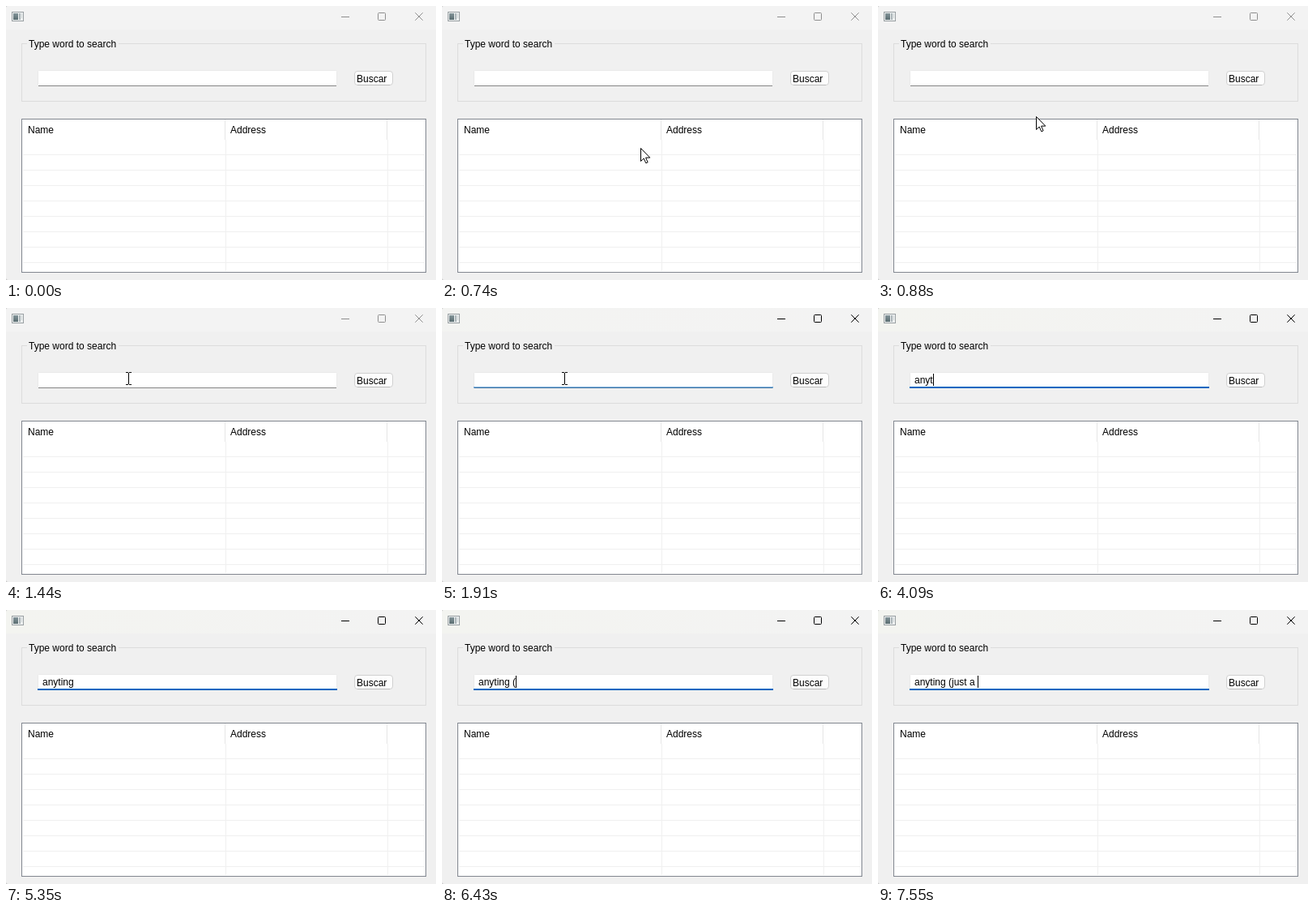
These frames come from a looping animation (531x338 px, 8000 ms). An HTML page:

```html
<!DOCTYPE html>
<html lang="en">
<head>
<meta charset="utf-8">
<title>Search window</title>
<style>
html, body { margin: 0; width: 100%; height: 100%; overflow: hidden; background: #f0f0f0; }
#win { position: relative; width: 531px; height: 338px; overflow: hidden; }
svg { position: absolute; left: 0; top: 0; }
.t {
  position: absolute; white-space: pre; color: #000;
  font: 12px/14px "Liberation Sans", Arial, sans-serif;
}
.line { shape-rendering: crispEdges; }
#caret {
  display: inline-block; vertical-align: top;
  width: 1px; height: 15px; margin-top: -1px; background: #000;
}
</style>
</head>
<body>
<div id="win">
  <svg width="531" height="338" viewBox="0 0 531 338">
    <defs>
      <linearGradient id="tint">
        <stop offset="0" stop-color="#f3f4f0"/>
        <stop offset="1" stop-color="#f3f3f3"/>
      </linearGradient>
      <linearGradient id="pane" x2="0" y2="1">
        <stop offset="0" stop-color="#84959a"/>
        <stop offset="1" stop-color="#5a6d71"/>
      </linearGradient>
    </defs>
    <rect width="531" height="338" fill="#f0f0f0"/>
    <rect width="531" height="29" fill="#f3f3f3"/>
    <rect id="active" width="531" height="29" fill="url(#tint)" opacity="0"/>
    <path d="M0 335v3h3a3 3 0 0 1-3-3zM0 2V0h2a2 2 0 0 0-2 2z" fill="#c4c4c4"/>

    <!-- window icon -->
    <g class="line">
      <rect x="7" y="7" width="15" height="12" fill="#9aa0a3"/>
      <rect x="8" y="8" width="13" height="10" fill="#eef1f1"/>
      <rect x="9" y="9" width="6" height="8" fill="url(#pane)"/>
      <rect x="16" y="9" width="2" height="8" fill="#a9b3b7"/>
      <rect x="19" y="9" width="1" height="6" fill="#cfd5d7"/>
    </g>
    <g id="caption" fill="none">
      <path d="M414 13.500h10"/>
      <rect x="459.500" y="8.500" width="9" height="9" rx="1"/>
      <path d="M505.300 8.300l9.400 9.400M514.700 8.300l-9.400 9.400"/>
    </g>

    <!-- group box, field and button -->
    <path class="line" d="M26 46.500H19.500V117.500H518.500V46.500H139" fill="none" stroke="#dcdcdc"/>
    <rect x="39.500" y="79.500" width="369" height="19" rx="1" fill="#fff" stroke="#eaeaea"/>
    <path class="line" d="M40 98.500h368" stroke="#868686"/>
    <rect id="focus" class="line" x="39" y="97" width="370" height="2" fill="#0067c0" opacity="0"/>
    <rect x="430.500" y="80.500" width="47" height="17" rx="3.500" fill="#fdfdfd" stroke="#d0d0d0"/>
    <path d="M434 97.500h40" stroke="#bcbcbc"/>

    <!-- list -->
    <rect class="line" x="19.500" y="139.500" width="499" height="189" fill="#fff" stroke="#828790"/>
    <path class="line" d="M270.500 140v25M470.500 140v25" stroke="#e5e5e5"/>
    <path id="grid" class="line" fill="none" stroke="#f0f0f0"/>
  </svg>

  <div class="t" style="left:28px;top:40px">Type word to search</div>
  <div class="t" style="left:433px;top:83px">Buscar</div>
  <div class="t" style="left:27px;top:146px">Name</div>
  <div class="t" style="left:277px;top:146px">Address</div>
  <div class="t" style="left:45px;top:82px"><span id="typed"></span><i id="caret"></i></div>

  <svg width="531" height="338" viewBox="0 0 531 338">
    <path id="arrow" d="M.5.5v16l3.700-3.500 2.600 5.800 2.300-1-2.500-5.700h5.200z" fill="#fff" stroke="#000"/>
    <path id="beam" class="line" d="M-3-7.500h3M1-7.500h3M.5-7v14M-3 7.500h3M1 7.500h3" fill="none" stroke="#000"/>
  </svg>
</div>
<script>
const $ = id => document.getElementById(id);
const LOOP = 8000, TICK = 70, BLINK = 530;
const ENTER = 390, FIELD = 1230, CLICK = 1840, FOCUS = 2050;

// typing comes in bursts: start, letters, gap between them
const phrase = "anyting (just a ";
const bursts = [
  [3280, 4, 270], [4420, 3, 200], [5420, 1, 0],
  [6430, 3, 200], [6960, 1, 0], [7160, 4, 130]
];
const keys = bursts.flatMap(([at, n, gap]) =>
  Array.from({ length: n }, (_, i) => at + i * gap));

let rows = "M271.500 165V327M471.500 165V327";
for (let y = 183.5; y < 328; y += 19) rows += `M21 ${y}H517`;
$("grid").setAttribute("d", rows);

const show = (el, on) => { el.style.visibility = on ? "" : "hidden"; };
const place = (el, x, y) =>
  el.setAttribute("transform", `translate(${Math.round(x)} ${Math.round(y)})`);
const clamp = v => Math.min(1, Math.max(0, v));
const glide = (from, to, u, power) => to + (from - to) * (1 - u) ** power;

// the screen refreshes once per tick
const progress = (t, from, to) =>
  clamp(Math.floor((t - from) / TICK) * TICK / (to - from));

function drawPointer(t) {
  const u = progress(t, ENTER, FIELD - TICK);
  place($("arrow"), glide(469, 157, u, 2.09), glide(319, 98, u, 1.74));
  const v = progress(t, FIELD, FIELD + 3 * TICK);
  place($("beam"), glide(156, 151, v, 1), glide(92, 87, v, 1));
  show($("arrow"), t >= ENTER && t < FIELD);
  show($("beam"), t >= FIELD && t < keys[0]);
}

function drawFocus(t) {
  const fade = progress(t, CLICK - TICK, FOCUS);
  $("active").setAttribute("opacity", fade);
  $("focus").setAttribute("opacity", fade);
  $("caption").setAttribute("stroke", t < CLICK ? "#8e8e8e" : "#000");
}

function drawTyping(t) {
  const n = keys.filter(k => t >= k).length;
  $("typed").textContent = phrase.slice(0, n);
  const last = n ? keys[n - 1] : FOCUS;
  show($("caret"), t >= FOCUS && Math.floor((t - last) / BLINK) % 2 === 0);
}

function draw(t) {
  drawPointer(t);
  drawFocus(t);
  drawTyping(t);
}

const start = performance.now();
function frame(now) {
  draw(Math.max(0, now - start) % LOOP);
  requestAnimationFrame(frame);
}
draw(0);
requestAnimationFrame(frame);
</script>
</body>
</html>
```
